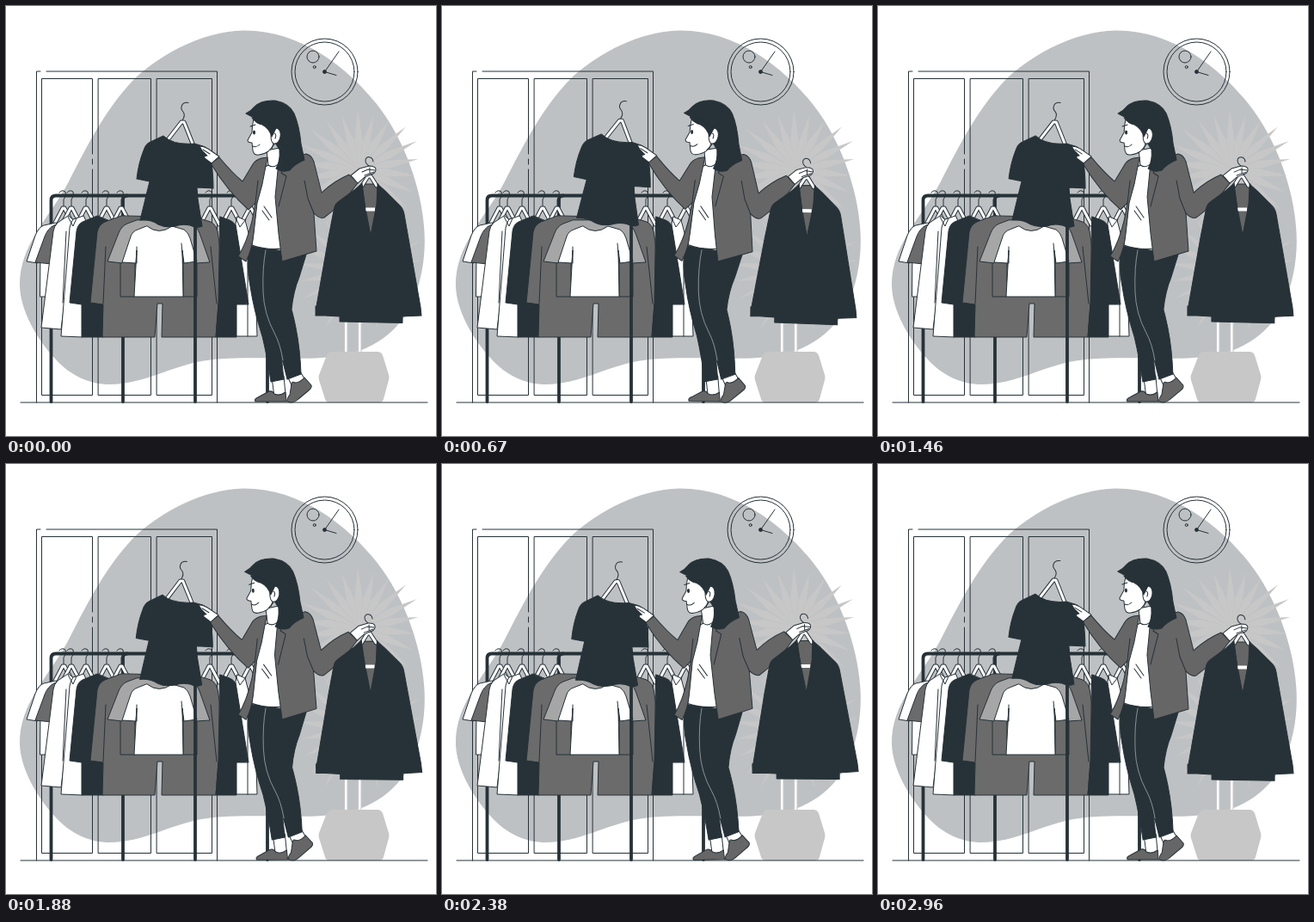
These frames come from a looping animation (500 by 500 pixels, 3 s). An HTML page:

```html
<!DOCTYPE html>
<html lang="en">
<head>
<meta charset="utf-8">
<title>Choosing clothes</title>
<style>
html, body { margin: 0; width: 100%; height: 100%; overflow: hidden; background: #fff; }
svg { display: block; width: 500px; height: 500px; }
.line { fill: none; }
.dark { fill: #263238; }
.grey { fill: #6b6b6b; }
.coat { fill: #666; }
.pale { fill: #a6a6a6; }
.white { fill: #fff; }
.plant { fill: #c7c7c7; stroke: none; }
.post { fill: none; stroke-width: 3.8; }
.seam { fill: none; stroke: #a3a9ac; stroke-width: .8; }
</style>
</head>
<body>
<svg viewBox="0 0 500 500" stroke="#263238" stroke-width="1" stroke-linejoin="round" stroke-linecap="round">
  <path fill="#bec1c3" stroke="none" d="M275 28.500C230 30 184 53 150 84C117 118 95 161 73 204C52 245 15 277 16 326C17 354 35 386 57 410C75 430 97 440 121 440C160 439 183 423 222 414C263 405 325 412 367 409C420 407 453 382 470 350C484 322 489 286 486 256C483 215 465 157 431 114C396 70 340 27 275 28.500Z"/>

  <g class="line">
    <path d="M35.500 461V76H40M47 76H245.500V461"/>
    <path d="M100.500 172V84.500H41.500V452.500H100.500V190M100.500 178V184M107.500 84.500H168.500V452.500H107.500ZM175.500 84.500H239.500V452.500H175.500Z"/>
    <circle cx="370.500" cy="76.500" r="38.500"/>
    <circle cx="370.500" cy="76.500" r="34.500"/>
    <circle cx="357" cy="59" r="7"/>
    <circle cx="358.700" cy="71" r="1.500"/>
    <path d="M387 53L370.500 76.500L384 80.500"/>
    <circle class="dark" cx="370.500" cy="76.500" r="2"/>
  </g>

  <g class="plant">
    <g id="leaves"></g>
    <path d="M394 320H397V403H394ZM410 320H413V403H410Z" fill="#fff" stroke="#c7c7c7"/>
    <path d="M379 402H432Q436 402 438 406L445 429Q446 432 445 435L439 457Q438 461 434 461H376Q372 461 371 457L364 435Q363 432 364 429L373 406Q375 402 379 402Z"/>
  </g>
  <path class="line" d="M17 461H490"/>

  <g id="rack">
    <path class="post" d="M52.500 460V226Q52.500 220.500 58 220.500H298Q304 220.500 304 226V460"/>
    <path class="post" d="M136 460V225Q136 220.500 141 220.500"/>
    <g id="hangers"></g>

    <path class="white" d="M40 290L39.500 338H52V290Z"/>
    <path class="white" d="M58 252L44 255Q38 257 34 267L24 297L37 299L60 270Z"/>
    <path class="grey" d="M68 250L56 255Q49 258 45 268L34 298L53 300L68 270Z"/>
    <path class="white" d="M72 244L60 252Q56 256 55 262L41 374L64 376L80 250Z"/>
    <path class="white" d="M90 244L78 248Q75 252 74 258L64 384L89 385L97 260Z"/>
    <path class="line" d="M72 245L78 256L82 247M70 262L66 345"/>
    <path class="dark" d="M106 244L89 251Q83 254 82 262L74 345L88 347V385H113L120 250Z"/>
    <path class="grey" d="M134 244L115 251Q108 254 106 263L98 345L113 347L112 385H173L176 346H182L181 385H244L247 346L259 345L246 262Q244 254 238 251L222 246Z"/>
    <path class="line" d="M116 280L113 346M245 346L238 280"/>
    <path class="dark" d="M249 245L260 249Q267 252 269 260L282 346L268 347V385H244L247 346Z"/>
    <path class="white" d="M269 245L278 249L289 290L292 384H268V347H282L267 254Z"/>
    <path class="line" d="M267 246L272 257L279 248M281 290V384"/>
    <path class="grey" d="M133 290V338H150V290ZM206 290V338H222V290Z"/>
    <path class="pale" d="M152 249L141 253Q134 256 131 264L118 297L135 299L148 275L206 275L221 299L237 298L225 264Q222 256 215 253L204 249Z"/>
    <path class="white" d="M164 256Q178 267 193 256L207 260Q212 263 214 270L222 297L207 299L205 284L206 338H149L152 284L151 299L135 298L145 268Q147 262 153 260Z"/>
    <path class="line" d="M152 299V280M206 299L204 276"/>
    <path class="post" d="M220 220.500V460"/>
  </g>

  <g id="figure">
    <!-- legs and shoes -->
    <path class="white" d="M309 431L323 430L325 452L312 455ZM327 430L342 425L348 435L333 443Z"/>
    <path class="coat" d="M290 460Q288 457 293 455L304 449Q309 446 312 451Q318 454 325 449L326 460Z"/>
    <path class="coat" d="M327 460Q326 457 330 452L332 439Q333 436 336 438Q342 438 347 432L355 441Q356 444 352 447L340 457Q336 461 331 461Z"/>
    <path class="dark" d="M283 279Q279 302 284 326Q288 353 298 384Q304 409 308 437L323 434L320 406L327 434L343 428Q342 399 337 374Q334 360 332 353Q334 332 341 315L349 289Z"/>
    <path class="seam" d="M302 284Q298 304 299 332Q300 358 312 380Q319 393 322 412"/>

    <!-- blouse, neck and open blazer -->
    <path class="white" d="M303 168L305 185L296 190L286 278Q302 284 321 282L323 185L318 165Z"/>
    <path class="line" d="M300 233L309 246M298 238L306 249M305 185Q312 190 319 181"/>
    <path class="coat" d="M304 176L297 177Q290 179 287 184L275 204Q263 194 248 176L238 183Q258 216 282 237L290 229L286 250Q280 275 270 291L279 297Q286 284 288 265L292 229L298 207Z"/>
    <path class="line" d="M290 229L293 203"/>
    <path class="coat" d="M321 179L349 172Q355 173 358 181L367 217Q382 203 399 196L409 206Q391 231 370 246Q365 248 358 241L361 285L321 297L317 265L313 222L316 191Z"/>
    <path class="line" d="M358 241L351 224L347 203M325 181L320 194L326 198L317 233"/>

    <!-- head -->
    <path class="dark" d="M279 125Q285 122 289 117Q297 109 313 110Q329 113 335 125Q341 139 343 160L347 179Q335 184 330 191Q321 194 314 189Q319 181 318 167L297 134Q288 130 279 125Z"/>
    <path class="white" d="M288 131Q286 140 286 147L281 156Q281 159 286 159L287 168Q288 174 294 173Q301 172 305 169L312 161L314 145Q304 142 298 133Z"/>
    <path class="white" d="M308 151Q309 142 315 142Q320 144 319 152Q317 161 311 160Q308 158 308 151Z"/>
    <path class="dark" d="M286 130L296 130Q304 138 314 142L309 152Q306 142 298 138Q291 137 286 130Z"/>
    <path class="line" d="M287 163Q291 165 295 161M284 140L290 138M312 148Q315 149 313 154M311 160L309 166"/>
    <ellipse class="dark" cx="288.500" cy="147" rx="1" ry="2"/>

    <!-- T-shirt on its hanger -->
    <path class="line" d="M212 112.500C204 111 202 119 206 123Q209 127 205 133"/>
    <g class="line">
      <path stroke-width="5" d="M187 157L204 135H207L217 160"/>
      <path stroke="#fff" stroke-width="3" d="M187 157L204 135H207L217 160"/>
    </g>
    <path class="dark" d="M183 151Q195 162 219 160L229 163Q235 165 237 172Q241 190 241 212L222 211L223 224L228 256Q222 259 214 255Q204 253 197 256Q185 258 177 254Q168 248 156 249L163 220L167 204L152 201Q154 183 160 168Q162 161 168 158Z"/>
    <path class="white" d="M225 163Q230 163 235 166L248 175L239 183L231 177Q230 174 234 174L228 168Z"/>
    <path class="line" d="M229 167L237 172"/>

    <!-- Jacket on its hanger -->
    <path class="line" d="M427 181C426 174 418 174 418 180Q418 183 422 186V198"/>
    <path class="coat" d="M413 207H433L430 248L424 268Z"/>
    <g class="line">
      <path stroke-width="5" d="M414 209L421 198H424L431 209"/>
      <path stroke="#fff" stroke-width="3" d="M414 209L421 198H424L431 209"/>
    </g>
    <path class="white" stroke="none" d="M418 234.500H429V238.500H418Z"/>
    <path class="dark" d="M414 206L405 214L386 228Q382 231 381 238L375 269L361 349H360V360H371L388 361V367L461 368.500V361L483 360L482 350L472 293L463 242Q462 236 458 232L441 215L432 207L431 230L424 267L418 238Z"/>
    <path class="white" d="M401 197L411 189L422 186Q430 186 430 190Q430 195 424 196L417 199L409 206Z"/>
    <path class="line" d="M414 193L421 190L429 191M417 197L428 193M423 188V194"/>
  </g>
</svg>
<script>
const byId = id => document.getElementById(id);

const ray = (x, y, angle, r) => {
  const at = (d, side) => [
    x + d * Math.cos(angle) - side * Math.sin(angle),
    y + d * Math.sin(angle) + side * Math.cos(angle)
  ].map(v => v.toFixed(1)).join();
  return `M${x},${y}L${at(r * .5, 4.5)}L${at(r, 0)}L${at(r * .5, -4.5)}Z`;
};
const burst = (x, y, r, count) => Array.from({ length: count }, (_, i) =>
  ray(x, y, i / count * 2 * Math.PI - 1.6, r + 5 * Math.sin(i * 5))).join('');
byId('leaves').innerHTML = `<path d="${burst(411, 190, 70, 22)}${burst(411, 308, 74, 22)}"/>`;

const hanger = x => {
  const bar = `M${x - 11} 254L${x - 1} 235H${x + 1}L${x + 11} 254`;
  return `<g class="line"><path d="M${x - 5} 217Q${x - 2} 213 ${x + 2} 216Q${x + 4} 221 ${x} 225V234"/>
    <path stroke-width="5" d="${bar}"/><path stroke="#fff" stroke-width="3" d="${bar}"/></g>`;
};
byId('hangers').innerHTML = [67, 76, 93, 117, 134, 237, 262, 284].map(hanger).join('');

// Linear sway: 0 → 1° → -1° → 0
const LOOP = 3000;
const sway = p => p < .25 ? 4 * p : p < .75 ? 2 - 4 * p : 4 * p - 4;
const start = performance.now();
function draw() {
  const p = (performance.now() - start) % LOOP / LOOP;
  byId('figure').setAttribute('transform', `rotate(${sway(p)} 318 286)`);
  requestAnimationFrame(draw);
}
draw();
</script>
</body>
</html>
```
